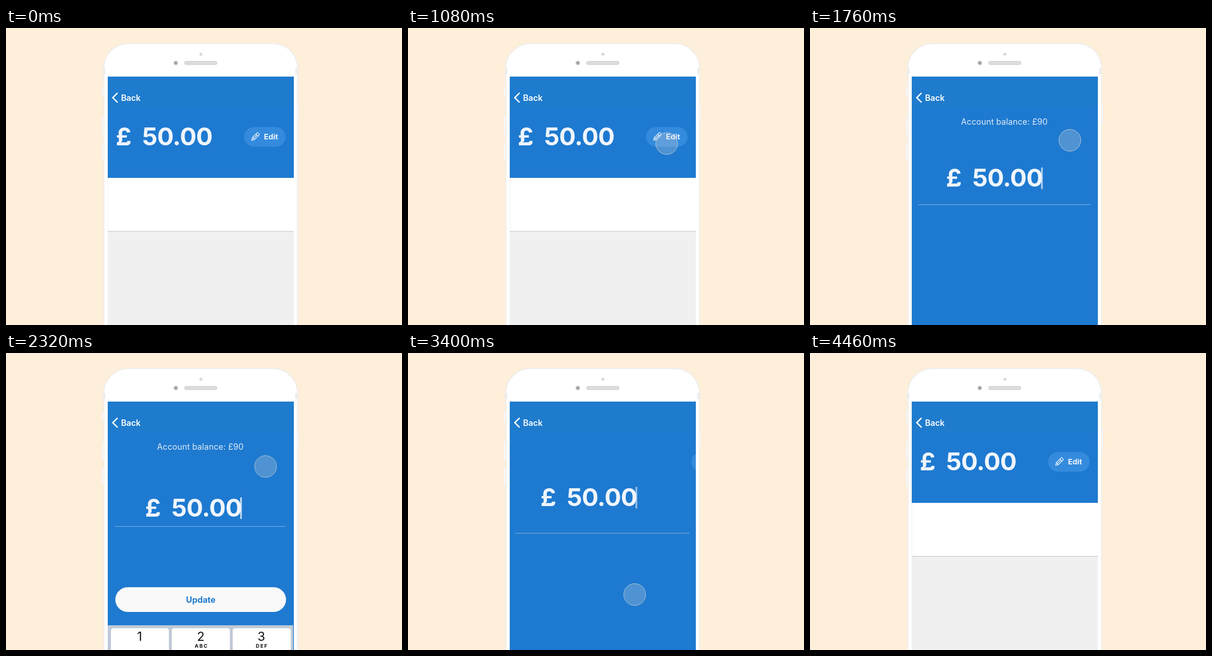
Recreate the animation shown at these times as an HTML page. Size 864 by 648 pixels, loop 5.68 s.

```html
<!DOCTYPE html>
<html lang="en">
<head>
<meta charset="utf-8">
<title>Edit amount</title>
<style>
html, body { margin: 0; width: 100%; height: 100%; overflow: hidden; background: #feefda; }
svg { display: block; width: 864px; height: 648px; font-family: Inter, Roboto, sans-serif; }

.move { animation: open 5680ms ease infinite both; }
.panel { --to: translateY(450px); animation-delay: 7ms; }
.amount { --to: translate(64px, 101px); }
.edit { --to: translateX(128px); }
.rule { --to: translate(-1px, -65px) scaleX(.916); transform-box: fill-box; transform-origin: center;
  animation-name: open, tint; }
.caret { animation: caret 5680ms ease infinite both; }
.balance { animation: balance 5680ms step-end infinite both; }
.keys { animation: keys 5680ms ease infinite both; }
.update { animation: update 5680ms ease infinite both; }
.touch { animation: touch 5680ms linear infinite both; }

/* The amount opens at 1540 ms and closes at 3340 ms, 360 ms each way. */
@keyframes open {
  0%, 27.113%, 65.141%, 100% { transform: none; }
  33.451%, 58.803% { transform: var(--to); }
}
@keyframes tint {
  0%, 27.113%, 65.141%, 100% { fill: rgba(188, 188, 188, 1); }
  33.451%, 58.803% { fill: rgba(255, 255, 255, .5); }
}
@keyframes caret {
  0%, 27.113%, 65.141%, 100% { opacity: 0; }
  33.451%, 58.803% { opacity: .8; }
}
@keyframes balance {
  0% { opacity: 0; }
  27.29% { opacity: 1; }
  58.98%, 100% { opacity: 0; }
}
@keyframes keys {
  0%, 31.338% { transform: translateY(60px); }
  37.676%, 58.97% { transform: none; }
  58.98%, 100% { transform: translateY(60px); }
}
@keyframes update {
  0%, 31.338% { opacity: 0; }
  37.676%, 58.97% { opacity: 1; }
  58.98%, 100% { opacity: 0; }
}
@keyframes touch {
  0%, 6.074% { transform: translate(785px, -28px); animation-timing-function: cubic-bezier(.5, 1, .89, 1); }
  13.116% { transform: translate(528.5px, 349.5px); animation-timing-function: cubic-bezier(.25, 1, .5, 1); }
  25% { transform: translate(567px, 245px); }
  39.437% { transform: translate(567px, 245px); animation-timing-function: cubic-bezier(.65, 0, .35, 1); }
  53.521% { transform: translate(494.5px, 527px); }
  72.359% { transform: translate(494.5px, 527px); animation-timing-function: cubic-bezier(.32, 0, .67, 0); }
  78.521% { transform: translate(781px, -84px); }
  100% { transform: translate(785px, -28px); }
}
</style>
</head>
<body>
<svg viewBox="0 0 864 648">
  <defs>
    <clipPath id="screen"><rect x="222" y="106" width="406" height="542"/></clipPath>
  </defs>

  <!-- Phone body -->
  <g fill="#fff" stroke="#ececec">
    <rect x="210" y="127" width="4" height="23" rx="1.5"/>
    <rect x="210" y="194" width="4" height="39" rx="1.5"/>
    <rect x="210" y="250" width="4" height="39" rx="1.5"/>
    <rect x="635" y="165" width="4" height="44" rx="1.5"/>
    <rect x="213.5" y="34" width="422.5" height="720" rx="53" stroke="#f0eeec" stroke-width="2.5"/>
  </g>
  <g fill="#eee">
    <rect x="211" y="88" width="6" height="13"/>
    <rect x="631" y="88" width="7" height="13"/>
  </g>
  <circle cx="425.3" cy="57.3" r="3.3" fill="#d9d9d9"/>
  <circle cx="370.5" cy="76.3" r="4.8" fill="#bdbdbd"/>
  <circle cx="370.5" cy="76.3" r="2" fill="#8f8f8f"/>
  <rect x="389.5" y="72.5" width="71" height="7.5" rx="3.75" fill="#dcdcdc" stroke="#cbcbcb"/>

  <g clip-path="url(#screen)">
    <rect x="222" y="106" width="406" height="337" fill="#fff"/>
    <rect x="222" y="443" width="406" height="205" fill="#f0f0f0"/>
    <path d="M222.5 327V648" stroke="#efefef"/>
    <path d="M222 443.5H394M448 443.5H628" stroke="#b9b9b9"/>
    <path d="M394 443.5H448" stroke="#d4d4d4"/>

    <rect class="move panel" x="222" y="-400" width="406" height="727" fill="#1e7ad0"/>
    <rect x="222" y="106" width="406" height="70" fill="#1e7bcd"/>
    <rect class="move rule" x="222" y="443" width="406" height="1"/>

    <path d="M242.5 142.5L233 152L242.5 161.5" fill="none" stroke="#fff" stroke-width="3" stroke-linecap="round" stroke-linejoin="round"/>
    <text x="251" y="158.7" font-size="18" font-weight="600" letter-spacing="-.1" fill="#fff">Back</text>
    <text class="balance" x="424" y="210.7" font-size="18" letter-spacing=".1" text-anchor="middle" fill="#dfebf8">Account balance: £90</text>

    <g class="move amount" fill="#eff5fc" font-size="54" font-weight="700">
      <text x="239.5" y="255.7">£</text>
      <text x="297" y="255.7" letter-spacing="-.9">50.00</text>
      <rect class="caret" x="447" y="214" width="3.5" height="47"/>
    </g>

    <g class="move edit">
      <rect x="519.5" y="216" width="90.5" height="43" rx="21.5" fill="#348bdd"/>
      <path d="M536 245l1.4-6L547.6 228.9a1.8 1.8 0 0 1 2.5 0l2 2a1.8 1.8 0 0 1 0 2.5L542 243.5zM537.4 239l4.6 4.5M545.2 231.3l4.5 4.5M539.6 241.2l8-8"
        fill="none" stroke="#eff5fc" stroke-width="1.4" stroke-linejoin="round"/>
      <text x="562.7" y="243" font-size="16.5" font-weight="700" fill="#eff5fc">Edit</text>
    </g>

    <g class="update">
      <rect x="238.5" y="511" width="372.5" height="54" rx="27" fill="#f9f9f9"/>
      <text x="425" y="545.3" font-size="18.3" font-weight="700" text-anchor="middle" fill="#1e7acd">Update</text>
    </g>

    <g class="keys" text-anchor="middle" fill="#111">
      <rect x="222" y="594" width="404.5" height="60" fill="#bfc9d7"/>
      <g fill="#a3abb6">
        <rect x="229" y="601.5" width="126.5" height="60" rx="5"/>
        <rect x="361.5" y="601.5" width="127" height="60" rx="5"/>
        <rect x="494.5" y="601.5" width="127" height="60" rx="5"/>
      </g>
      <g fill="#fff">
        <rect x="229" y="600.5" width="126.5" height="60" rx="5"/>
        <rect x="361.5" y="600.5" width="127" height="60" rx="5"/>
        <rect x="494.5" y="600.5" width="127" height="60" rx="5"/>
      </g>
      <g font-size="27">
        <text x="291.5" y="628">1</text>
        <text x="425" y="628">2</text>
        <text x="557" y="628">3</text>
      </g>
      <g font-size="11" font-weight="700" letter-spacing="2">
        <text x="426.5" y="643">ABC</text>
        <text x="558.5" y="643">DEF</text>
      </g>
    </g>
  </g>

  <circle class="touch" r="23.8" fill="rgba(217,217,217,.262)" stroke="rgba(212,214,217,.9)"/>
</svg>
</body>
</html>
```
